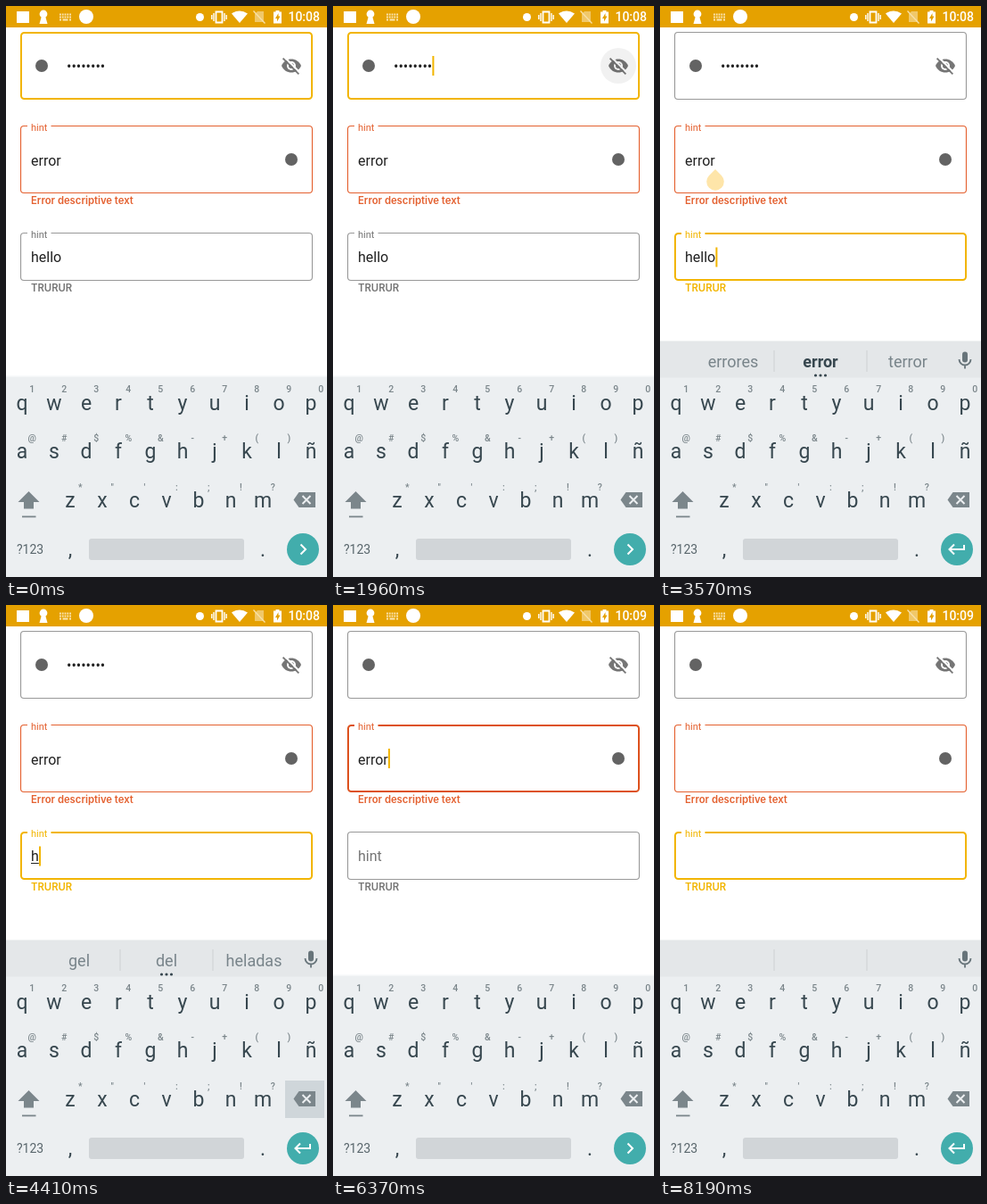
Write an HTML page that moves like this. It is 360 px wide and 640 px high and loops after 8400 ms.

```html
<!DOCTYPE html>
<html lang="en">
<head>
<meta charset="utf-8">
<title>Text fields</title>
<style>
html, body { margin: 0; width: 100%; height: 100%; overflow: hidden; background: #fff; }
svg { display: block; width: 360px; height: 640px; font-family: Roboto, sans-serif; }
.helper { font: 600 11.3px Inter, sans-serif; }
</style>
</head>
<body>
<svg id="stage" viewBox="0 0 360 640"></svg>
<script>
const LOOP = 8400;
const YELLOW = '#f2b500', ERROR = '#e4602f', GREY = '#757575', LINE = '#999', INK = '#37474f', KEY = '#7b868b';
const stage = document.getElementById('stage');

function set(node, attrs) {
  for (const name in attrs) node.setAttribute(name, attrs[name]);
}
function add(tag, attrs, parent = stage) {
  const node = document.createElementNS('http://www.w3.org/2000/svg', tag);
  set(node, attrs);
  return parent.appendChild(node);
}
function text(str, x, y, size, fill, attrs = {}, parent = stage) {
  const node = add('text', { x, y, 'font-size': size, fill, ...attrs }, parent);
  node.textContent = str;
  return node;
}
const rect = (x, y, width, height, fill, parent, attrs) => add('rect', { x, y, width, height, fill, ...attrs }, parent);
const circle = (cx, cy, r, fill, parent) => add('circle', { cx, cy, r, fill }, parent);
const path = (d, fill, parent, attrs) => add('path', { d, fill, ...attrs }, parent);
const stroke = (d, color, width, parent) => path(d, 'none', parent, { stroke: color, 'stroke-width': width });
const show = (node, on) => { node.style.display = on ? '' : 'none'; };
const middle = { 'text-anchor': 'middle' };

// Timelines: rows of [start, value...]; the last started row applies.
const focusSteps = [[-500, 'password'], [2650, 'error'], [3430, 'hello'], [4900, 'password'], [6300, 'error'], [7600, 'hello']];
const dots = n => '•'.repeat(n);
const textSteps = {
  password: [[-500, dots(8)], [5110, dots(8)], [5530, dots(7)],
    ...Array.from({ length: 7 }, (_, i) => [5810 + i * 58, dots(6 - i)])],
  error: [[-500, 'error'], [6860, 'erro'], [7180, 'err'], [7235, 'er'], [7290, 'e'], [7345, '']],
  hello: [[-500, 'hello'], [3900, 'hell'], [4270, 'hel'], [4340, 'he'], [4400, 'h'], [4480, '']]
};
const suggestionSteps = [[0, ''], [3150, 'errores error terror'], [3780, ''], [4270, 'gel del heladas'],
  [4480, ''], [6650, 'errores error terror'], [7345, '']];
const suggestionBar = [[2870, 5110], [6580, LOOP]];
const deletePress = [[3850, 4550], [5400, 6180], [6780, 7490]];
const underlined = { password: [], error: [[3150, 3430], [6650, 7345]], hello: [[3780, 4480]] };
const handles = [[2800, 3640, 62, 183], [5110, 5530, 111.5, 78], [6580, 6860, 62, 183]];

const at = (steps, t) => steps.filter(s => s[0] <= t).pop();
const within = (spans, t) => spans.some(([a, b]) => t >= a && t < b);
const ease = p => { p = Math.min(1, Math.max(0, p)); return p * p * (3 - 2 * p); };

// Status bar
rect(0, 0, 360, 24, '#e5a100');
rect(12, 6, 14, 13, '#fff');
circle(42, 9, 4.4, '#fff');
path('M40 11h4l2.5 9h-9z', '#fff');
for (let row = 0; row < 3; row++)
  stroke(`M60 ${9.5 + row * 3}h13`, '#fbe6b5', 1.8).setAttribute('stroke-dasharray', row < 2 ? '1.8 1' : '2 1.5 6 1.5');
circle(90, 12, 8, '#fff');
circle(217.5, 12.5, 4.5, '#fff');
stroke('M235.5 6.5h7v12h-7z', '#fff', 1.8);
stroke('M233 8v9M245 8v9M230.8 10v5M247.2 10v5', '#fff', 1.4);
path('M253 8.5Q262 2.5 271 8.5L262 19z', '#fff');
path('M279 9l3-3h7v12h-10z', '#f0c869');
stroke('M277.5 5.5l13 14', '#f7dfa6', 1.4);
path('M302.5 5h4v1.5h2.5v13h-9v-13h2.5z', '#fff');
path('M305.5 8l-3.5 6h2v3.5l3.5-6h-2z', '#e5a100');
const clock = text('', 352, 17, 14, '#fff', { 'text-anchor': 'end', 'font-weight': 500 });

// Text fields
function makeField(name, top, height, textX, baseline, caretTop, caretHeight) {
  const outline = add('rect', { fill: 'none', rx: 3.5 });
  const gap = rect(24, top - 1, 26.5, 4, '#fff');
  const label = text(name === 'password' ? '' : 'hint', 28, top + 5.5, 11, ERROR);
  const value = text('', textX, baseline, 16, '#212121');
  return { name, top, height, textX, outline, gap, label, value,
    underline: rect(textX, baseline + 2, 0, 1, '#212121'),
    caret: rect(0, caretTop, 2, caretHeight, YELLOW) };
}
const fields = [
  makeField('password', 29, 76, 68, 73, 56, 22),
  makeField('error', 134, 76, 28, 178.5, 161, 22),
  makeField('hello', 254, 54, 28, 287, 270.5, 22)
];
show(fields[0].gap, false);
text('Error descriptive text', 28, 222, 11.3, ERROR, { class: 'helper' });
const helper = text('TRURUR', 28, 320, 11.3, GREY, { class: 'helper' });
circle(40, 67, 7, '#636363');
circle(320, 172, 7, '#636363');

const eye = add('g', { transform: 'translate(308 55)' });
path('M1 12C5 2 19 2 23 12C19 22 5 22 1 12z', GREY, eye);
circle(12, 12, 5, '#fff', eye);
circle(12, 12, 3, GREY, eye);
stroke('M4 2L22 20', '#fff', 2, eye);
stroke('M2.6 3.6L20.4 21.4', GREY, 1.8, eye);
const ripple = circle(320, 67, 20, '#000');

const handle = path('M0 0h9.8a9.8 9.8 0 1 1-9.8 9.8z', '#fbb40a');

// Keyboard
rect(0, 414.5, 360, 2, '#f4f6f7');
rect(0, 416, 360, 224, '#eceff1');
const bar = add('g', {});
rect(0, 375, 360, 1.5, '#f0f2f3', bar);
rect(0, 376, 360, 40.5, '#e4e7e9', bar);
rect(127.5, 386, 1, 24, '#cdd2d4', bar);
rect(231.5, 386, 1, 24, '#cdd2d4', bar);
const words = [82, 180, 278].map(x => text('', x, 405, 18, '#78848a', middle, bar));
const more = add('g', {}, bar);
[174.5, 180, 185.5].forEach(x => circle(x, 414, 1.6, INK, more));
rect(339, 387.5, 6, 12, '#67747a', bar, { rx: 3 });
stroke('M335.5 396a6.5 6.5 0 0 0 13 0M342 402.5v4', '#67747a', 1.8, bar);

const deleteKey = rect(313, 533, 44, 42, '#cfd6da');
function keyRow(letters, hints, firstX, baseline) {
  [...letters].forEach((c, i) => text(c, firstX + 36 * i, baseline, 23, INK, middle));
  [...hints].forEach((c, i) =>
    text(c, firstX + 11.3 + 36 * i, baseline - 19.5, 10.5, KEY, { ...middle, 'font-weight': 500 }));
}
keyRow('qwertyuiop', '1234567890', 18, 452.5);
keyRow('asdfghjklñ', '@#$%&-+()', 18, 507);
keyRow('zxcvbnm', '*"\':;!?', 72, 562);
path('M25.5 544l12 12h-6.5v7.5h-11v-7.5h-6.500z', KEY);
rect(18, 571.5, 15.5, 1.8, KEY);
path('M322.500 553.5l6-8.500h18.500v17h-18.500z', KEY);
stroke('M332.500 549l9 9m0-9l-9 9', '#eceff1', 2);
text('?123', 12, 614, 14, '#58656b');
text(',', 72, 616.5, 23, INK, middle);
text('.', 288, 616.5, 23, INK, middle);
rect(93, 597, 174, 24, '#d1d5d8', stage, { rx: 3 });
circle(333, 609, 18, '#42adac');
const nextIcon = stroke('M330.500 603.5l5.500 5.500l-5.500 5.500', '#fff', 2);
const enterIcon = stroke('M341 604v5h-16M330 603.5l-5.500 5.500l5.500 5.500', '#fff', 2);

function drawField(field, focus, t) {
  const { name, top, height, textX } = field;
  const focused = focus[1] === name;
  const idle = name === 'error' ? ERROR : LINE;
  const width = focused ? 2 : 1.1;
  set(field.outline, {
    x: 16 + width / 2, y: top + width / 2, width: 328 - width, height: height - width,
    stroke: focused ? (name === 'error' ? '#dd511d' : YELLOW) : idle, 'stroke-width': width
  });

  const [edited, str] = at(textSteps[name], t);
  field.value.textContent = str;
  const length = str ? field.value.getComputedTextLength() : 0;
  set(field.underline, { width: length });
  show(field.underline, within(underlined[name], t));
  set(field.caret, { x: textX + length + 0.2 });
  show(field.caret, focused && (t - Math.max(focus[0], edited)) % 1000 < 500 && (t >= 500 || name !== 'password'));
}

function drawHelloLabel(field, focused, t) {
  const float = 1 - ease((t - 4900) / 140) + ease((t - 7600) / 140);
  const color = focused ? YELLOW : GREY;
  set(field.label, { y: 286.5 - 27 * float, 'font-size': 16 - 5 * float, fill: color });
  show(field.gap, float > 0.05);
  set(helper, { fill: color });
}

function draw(t) {
  const focus = at(focusSteps, t);
  clock.textContent = t < 4550 ? '10:08' : '10:09';
  fields.forEach(field => drawField(field, focus, t));
  drawHelloLabel(fields[2], focus[1] === 'hello', t);

  const press = ease((t - 1820) / 120);
  set(ripple, { r: 20 * press, opacity: 0.055 * press * (1 - ease((t - 2050) / 250)) });

  const grip = handles.find(([a, b]) => t >= a && t < b);
  show(handle, grip);
  if (grip) set(handle, {
    transform: `translate(${grip[2]} ${grip[3]}) rotate(45)`,
    opacity: grip[0] === 2800 ? 1 - 0.65 * ease((t - 3430) / 140) : 1
  });

  const hasBar = within(suggestionBar, t);
  show(bar, hasBar);
  show(enterIcon, hasBar);
  show(nextIcon, !hasBar);
  show(deleteKey, within(deletePress, t));
  const list = at(suggestionSteps, t)[1].split(' ');
  words.forEach((word, i) => { word.textContent = list[i] || ''; });
  const exact = list[1] === 'error';
  set(words[1], { 'font-weight': exact ? 700 : 400, fill: exact ? INK : '#78848a' });
  show(more, list.length > 1);
}

const start = performance.now();
function tick() {
  draw((performance.now() - start) % LOOP);
  requestAnimationFrame(tick);
}
tick();
</script>
</body>
</html>
```
